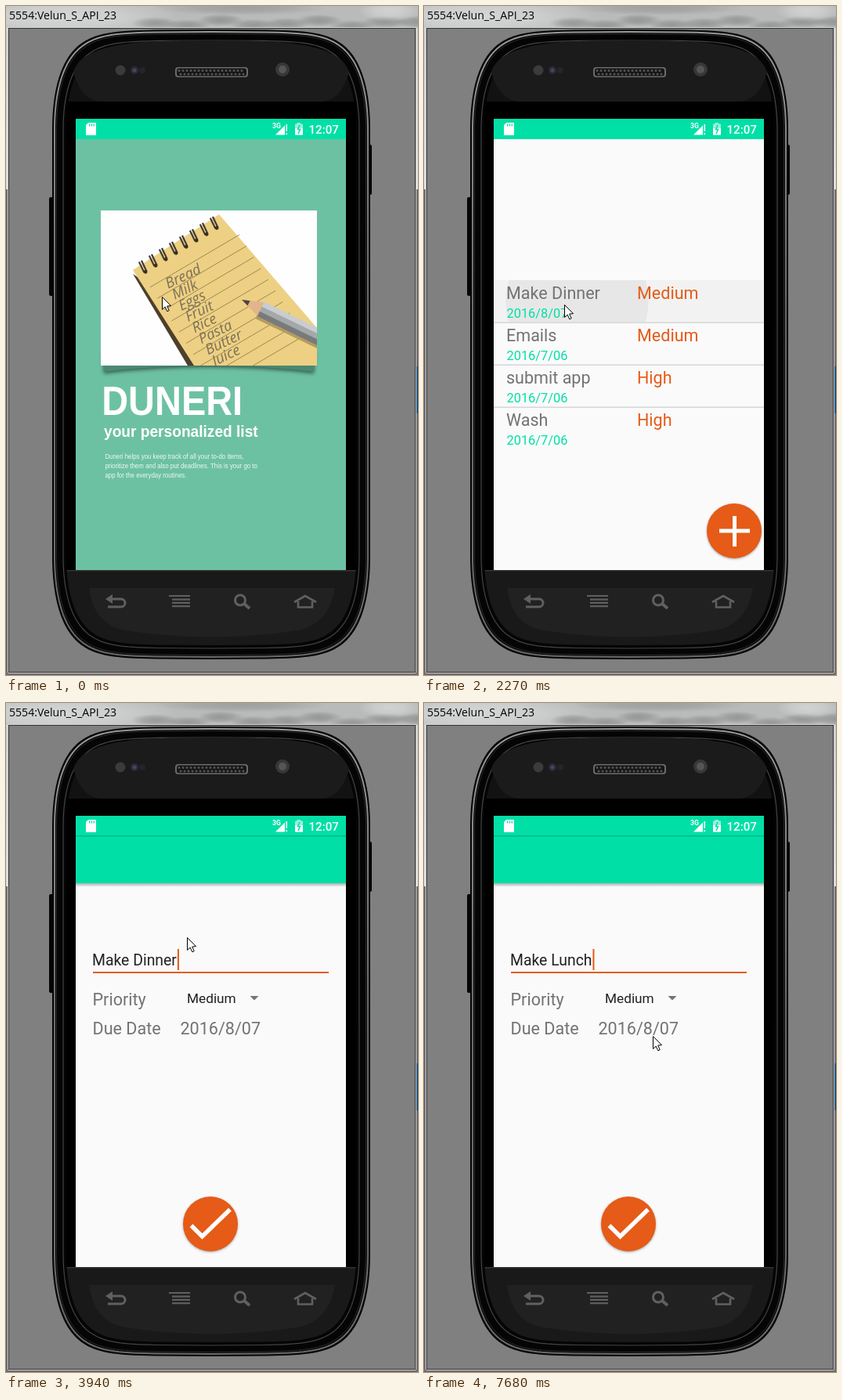
These frames come from a looping animation (526 by 854 pixels, 8 s). An HTML page with a canvas:

```html
<!DOCTYPE html>
<html lang="en">
<head>
<meta charset="utf-8">
<title>To-do app on a phone</title>
<style>
html, body { margin: 0; width: 100%; height: 100%; overflow: hidden; background: #808080; }
canvas { display: block; }
</style>
</head>
<body>
<canvas id="stage" width="526" height="854"></canvas>
<script>
const W = 526, H = 854, LOOP = 8000, TICK = 120;
const GREEN = '#00e0a6', ORANGE = '#e55b17', PAPER = '#fafafa', GREY = '#737373', INK = '#212121';
const SCREEN = { x: 89, y: 144, w: 345, h: 576 };
const SP = 1.078;

const stage = document.getElementById('stage').getContext('2d');
const makeLayer = () => Object.assign(document.createElement('canvas'), { width: W, height: H }).getContext('2d');
const phoneLayer = makeLayer(), windowLayer = makeLayer();
let g = stage;

// ---------- helpers ----------
function rect(x, y, w, h, fill) { g.fillStyle = fill; g.fillRect(x, y, w, h); }

function round(x, y, w, h, r, fill) {
  g.beginPath(); g.roundRect(x, y, w, h, r);
  g.fillStyle = fill; g.fill();
}

function disc(x, y, r, fill) {
  g.beginPath(); g.arc(x, y, r, 0, 7);
  g.fillStyle = fill; g.fill();
}

function trace(points, closed) {
  g.beginPath();
  points.forEach(([x, y]) => g.lineTo(x, y));
  if (closed) g.closePath();
}

function poly(points, fill) { trace(points, true); g.fillStyle = fill; g.fill(); }

function line(points, width, color) {
  trace(points); g.lineWidth = width; g.strokeStyle = color; g.stroke();
}

function at(x, y, angle, draw) {
  g.save(); g.translate(x, y); g.rotate(angle); draw(); g.restore();
}

function text(s, x, y, size, color, font = 'Roboto, sans-serif', style = '') {
  g.font = `${style} ${size}px ${font}`;
  g.fillStyle = color;
  g.fillText(s, x, y);
}

const label = (s, x, y, sp, color) => text(s, x, y, sp * SP, color);

function fade(y0, y1, top, bottom) {
  const f = g.createLinearGradient(0, y0, 0, y1);
  f.addColorStop(0, top); f.addColorStop(1, bottom);
  return f;
}

function glow(x, y, rx, ry, rgb, alpha) {
  g.save();
  g.translate(x, y); g.scale(rx, ry);
  const f = g.createRadialGradient(0, 0, 0, 0, 0, 1);
  f.addColorStop(0, `rgba(${rgb},${alpha})`);
  f.addColorStop(0.5, `rgba(${rgb},${alpha * 0.7})`);
  f.addColorStop(1, `rgba(${rgb},0)`);
  disc(0, 0, 1, f);
  g.restore();
}

function button(x, y, r) {
  g.save();
  g.shadowColor = 'rgba(0,0,0,.35)'; g.shadowBlur = 3; g.shadowOffsetY = 1;
  disc(x, y, r, ORANGE);
  g.restore();
}

// ---------- emulator window and phone ----------
// Straight sides closed by half superellipses at the top and bottom.
function bodyPath(inset) {
  const half = 203 - inset;
  g.beginPath();
  for (let i = 0; i < 240; i++) {
    const a = i / 240 * 2 * Math.PI, c = Math.cos(a), s = Math.sin(a);
    const u = Math.sign(c) * Math.abs(c) ** (2 / 7);
    const v = Math.abs(s) ** (2 / 2.2) * (1 - 0.03 * u * u);
    g.lineTo(262 + half * u, s < 0 ? 160 - (130 - inset) * v : 700 + (134 - inset) * v);
  }
  g.closePath();
}

function rim(inset, width, color) {
  bodyPath(inset); g.strokeStyle = color; g.lineWidth = width; g.stroke();
}

function drawWindowFrame() {
  rect(0, 0, W, H, fade(0, 234, '#c9cbcb', '#e0e0e0'));
  rect(0, 234, W, H, '#706b70');
  rect(522, 460, 4, 60, '#24577d');
  rect(0, 0, W, 28, '#b9bbbb');
  glow(70, 14, 150, 26, '225,227,227', 0.7);
  for (let i = 0; i < 9; i++) glow(190 + i * 42, 22 + 4 * Math.sin(i * 2.3), 30, 8, '120,122,122', 0.55);
  glow(300, 2, 110, 10, '140,142,142', 0.6);
  glow(490, 6, 40, 14, '225,225,225', 0.6);
  round(2, 27, 522, 825, 2, '#d4d4d4');
  rect(3, 28, 520, 823, '#333');
  rect(4, 29, 518, 821, '#808080');
  text('5554:Velun_S_API_23', 4, 17, 14.1, '#000', '"Open Sans", "Noto Sans", sans-serif');
}

function drawPhone() {
  round(55, 244, 8, 126, 2, '#050505');
  round(461, 177, 6, 64, 2, '#050505');
  bodyPath(0); g.fillStyle = '#050505'; g.fill();
  rim(3, 2, fade(30, 400, '#999', '#6a6a6a'));
  rim(5.5, 1, '#2c2c2c');
  rim(14, 1.2, '#444');

  g.save();
  bodyPath(18); g.clip();
  rect(60, 30, 410, 92, '#121212');
  rect(60, 721, 410, 120, '#191919');
  rect(60, 720, 410, 1.5, '#333');
  g.restore();

  g.beginPath();
  g.moveTo(86, 84);
  g.bezierCurveTo(100, 42, 190, 45, 262, 44);
  g.bezierCurveTo(334, 45, 424, 42, 438, 84);
  g.quadraticCurveTo(428, 122, 400, 122);
  g.lineTo(124, 122);
  g.quadraticCurveTo(96, 122, 86, 84);
  g.fillStyle = '#1b1b1b'; g.fill();

  g.beginPath();
  g.moveTo(106, 743);
  g.lineTo(420, 743);
  g.quadraticCurveTo(412, 790, 372, 797);
  g.quadraticCurveTo(262, 814, 152, 797);
  g.quadraticCurveTo(112, 790, 106, 743);
  g.fillStyle = '#212121'; g.fill();

  disc(146, 82, 6.5, '#3b3b3b');
  disc(164, 82, 5, '#2b2b38'); disc(164, 82, 2.5, '#454560');
  disc(174, 82, 4, '#24242c');
  disc(353, 81, 9, '#383838'); disc(353, 81, 5, '#555');

  round(216, 78, 93, 13, 4, '#6b6b6b');
  round(218, 79.5, 89, 10, 3, '#161616');
  for (let x = 221; x < 306; x += 5) {
    disc(x, 82.5, 1.5, '#555'); disc(x + 2, 87, 1.5, '#555');
  }
  drawHardKeys('#606060');
  rect(77, 122, 370, 598, '#000');
}

function drawHardKeys(color) {
  g.strokeStyle = color; g.lineWidth = 3;
  g.beginPath();
  g.moveTo(134, 757); g.lineTo(147, 757);
  g.arc(147, 762, 5, -Math.PI / 2, Math.PI / 2);
  g.lineTo(130, 767); g.stroke();
  poly([[127, 757], [136, 751], [136, 763]], color);

  rect(208, 752, 27, 2, color);
  for (let i = 0; i < 3; i++) rect(212, 756.5 + i * 4.3, 23, 2.2, color);

  g.lineWidth = 3;
  g.beginPath(); g.arc(299, 758.5, 6.5, 0, 7); g.stroke();
  line([[304, 763], [311, 769]], 4, color);

  line([[368, 761], [382, 753], [396, 761]], 2.6, color);
  line([[373, 760], [373, 767.5], [391, 767.5], [391, 760]], 2.6, color);
}

// ---------- app screens ----------
function drawStatusIcons() {
  poly([[105, 149], [115, 149], [115, 165], [102, 165], [102, 152]], '#fff');
  for (let i = 0; i < 3; i++) rect(106 + i * 2.8, 150.5, 1.3, 3, GREEN);
  text('3G', 340, 156, 8.6, '#fff', 'Roboto, sans-serif', 'bold');
  poly([[344, 164.5], [356, 152.5], [356, 164.5]], '#fff');
  rect(356, 149, 4, 16, GREEN);
  rect(357.3, 151, 1.8, 9, '#d9f9ef'); rect(357.3, 162, 1.8, 2.3, '#d9f9ef');
  rect(371.5, 149, 4.5, 3, '#9beeda');
  round(369, 150.5, 10, 14, 1, '#9beeda');
  rect(369, 156, 10, 8.5, '#fff');
  line([[375, 152], [372.5, 157.5], [375.5, 157.5], [373, 163]], 1.6, GREEN);
  text('12:07', 386.5, 163, 14 * SP, '#fff', 'Roboto, sans-serif', '500');
}

function drawBase(background) {
  rect(SCREEN.x, SCREEN.y, SCREEN.w, SCREEN.h, background);
  rect(SCREEN.x, SCREEN.y, SCREEN.w, 26, GREEN);
}

function drawToolbar() {
  rect(89, 170, 345, 60, GREEN);
  rect(89, 169, 345, 1.5, 'rgba(0,60,40,.25)');
  rect(89, 230, 345, 5, fade(230, 235, 'rgba(0,0,0,.3)', 'rgba(0,0,0,0)'));
}

function drawPencil() {
  rect(26, 9, 100, 5, '#b69b5e');
  poly([[0, 0], [28, -10], [28, 10]], '#e2b48c');
  poly([[0, 0], [10, -3.5], [10, 3.5]], '#4b4540');
  ['#c9cdcf', '#a4a8aa', '#777b7e'].forEach((shade, i) => rect(27, -10 + i * 6.7, 100, 7, shade));
}

function drawNotepad() {
  g.save();
  g.beginPath(); g.rect(121, 261, 276, 198); g.clip();
  rect(121, 261, 276, 198, '#fefefe');
  poly([[162, 342], [174, 350], [242, 459], [232, 459]], '#4d402b');
  poly([[162, 337], [272, 266], [397, 411], [397, 459], [240, 459]], '#edd083');

  for (let i = 0; i < 10; i++) {
    const x = 184 + i * 9.2, y = 359 + i * 14.3;
    line([[x, y], [x + 114, y - 67]], 0.9, '#94804f');
  }
  for (let i = 0; i < 8; i++) at(175 + i * 13, 333 - i * 8, -0.45, () => {
    rect(-3, -8, 2.2, 15, '#3f3b35');
    rect(0.5, -8, 2.2, 15, '#3f3b35');
    disc(0, 7, 2.4, '#3a3021');
  });
  ['Bread', 'Milk', 'Eggs', 'Fruit', 'Rice', 'Pasta', 'Butter', 'Juice'].forEach((item, i) =>
    at(207 + i * 8.5, 361 + i * 14.1, -0.45, () =>
      text(item, 0, 0, 18.5, '#7d7057', '"Open Sans", sans-serif', 'italic')));
  at(301, 375, 0.45, drawPencil);
  g.restore();
}

function drawSplash() {
  drawBase('#6dc1a3');
  g.save();
  g.shadowColor = 'rgba(0,0,0,.55)'; g.shadowBlur = 5; g.shadowOffsetY = 2;
  g.beginPath();
  g.moveTo(124, 440); g.lineTo(125, 467);
  g.quadraticCurveTo(259, 451, 393, 467);
  g.lineTo(394, 440);
  g.fillStyle = '#4a8972'; g.fill();
  g.restore();
  drawNotepad();

  // The artwork is shown slightly narrowed to fit the screen.
  const font = '"Liberation Sans", Arial, sans-serif';
  g.save();
  g.translate(125, 0); g.scale(0.92, 1);
  text('DUNERI', -3, 521.5, 51, '#fff', font, 'bold');
  text('your personalized list', 0, 550, 20.8, '#fff', font, 'bold');
  ['Duneri helps you keep track of all your to-do items,',
   'prioritize them and also put deadlines. This is your go to',
   'app for the everyday routines.'].forEach((s, i) => text(s, 1.5, 578 + i * 12.2, 8.55, '#eef8f4', font));
  g.restore();
}

const TASKS = [
  ['Make Dinner', '2016/8/07', 'Medium'],
  ['Emails', '2016/7/06', 'Medium'],
  ['submit app', '2016/7/06', 'High'],
  ['Wash', '2016/7/06', 'High'],
];

function drawList(t) {
  drawBase(PAPER);
  if (t >= 2270) {
    g.save();
    g.beginPath(); g.rect(89, 350, 345, 53.5); g.clip();
    rect(89, 350, 345, 54, '#f2f2f2');
    disc(195.5, 377, 91, '#e7e7e7');
    g.restore();
  }
  TASKS.forEach(([name, date, priority], i) => {
    const y = 350 + i * 54;
    if (i) rect(89, y - 0.5, 345, 1.5, '#d6d6d6');
    label(name, 105, y + 24, 20, GREY);
    label(date, 105.5, y + 48, 15.2, GREEN);
    label(priority, 272, y + 24, 20, ORANGE);
  });
  button(396, 670, 35);
  rect(377, 667.5, 39, 5, '#fff');
  rect(394, 651, 5, 39, '#fff');
}

function drawDetail() {
  drawBase(PAPER);
  drawToolbar();
  button(132, 200, 24);
  for (const turn of [1, -1]) at(132, 200, turn * Math.PI / 4, () => rect(-18.5, -2, 37, 4, '#fff'));
  button(392, 200, 24);
  rect(376.5, 210, 30, 5, '#f2a681');
  at(392, 197, -Math.PI / 4, () => {
    poly([[-14, 0], [-10, -3.2], [7, -3.2], [7, 3.2], [-10, 3.2]], '#fff');
    rect(9, -3.2, 4, 6.4, '#fff');
  });

  [['TO-DO', 'Make Dinner', 20], ['Priority', 'Medium', 20], ['Due By', '2016/8/07', 18]].forEach(([name, value, sp], i) => {
    const y = 406 + i * 73;
    label(name, 105.5, y, 20, GREEN);
    label(value, 200.5, y - (20 - sp), sp, ORANGE);
  });
}

// Backspacing slows towards the end of the word; typing is steady after the first letter.
const eraseAt = k => 5050 + 120 * k + 0.85 * k ** 4;
const typeAt = k => k ? 7120 + 140 * k : 6890;

function typing(t) {
  const past = (word, when) => [...word].map((_, k) => when(k)).filter(time => time <= t);
  const erased = past('Dinner', eraseAt), typed = past('Lunch', typeAt);
  return {
    value: 'Make ' + (typed.length ? 'Lunch'.slice(0, typed.length) : 'Dinner'.slice(0, 6 - erased.length)),
    lastKey: Math.max(3520, ...erased, ...typed),
  };
}

function drawEdit(t) {
  drawBase(PAPER);
  drawToolbar();
  const { value, lastKey } = typing(t);
  label(value, 110, 335, 18, INK);
  const caretOn = Math.floor((t - lastKey) / 515) % 2 === 0;
  if (caretOn) rect(111 + g.measureText(value).width, 314, 2, 27, ORANGE);
  rect(111, 343, 301, 2, ORANGE);
  label('Priority', 110.5, 386, 20, GREY);
  label('Medium', 231, 382.5, 16, INK);
  poly([[311.5, 374], [322.5, 374], [317, 379.5]], '#757575');
  label('Due Date', 110.5, 423, 20, GREY);
  label('2016/8/07', 222.5, 423, 20, GREY);
  button(261, 665, 35);
  line([[236.5, 667], [250.5, 681], [286, 646.5]], 5.5, '#fff');
}

// ---------- timeline ----------
// Each screen: when it first shows, and how far its entrance has run by then.
const SCREENS = [
  { start: 0, lead: 400, draw: drawSplash },
  { start: 670, lead: 67, draw: drawList },
  { start: 2420, lead: 27, draw: drawDetail },
  { start: 3520, lead: 50, draw: drawEdit },
];

function drawApp(t) {
  const index = SCREENS.findLastIndex(s => s.start <= t);
  const { start, lead, draw } = SCREENS[index];
  const age = lead + Math.floor((t - start) / TICK) * TICK;
  const left = span => 1 - Math.min(age / span, 1);
  const slide = Math.round(SCREEN.h * 0.08 * left(350) ** 5);

  if (age < 350) {
    SCREENS[index - 1].draw(t);
    rect(SCREEN.x, SCREEN.y, SCREEN.w, SCREEN.h, `rgba(0,0,0,${age / 1000})`);
  }
  g = windowLayer;
  g.clearRect(0, 0, W, H);
  draw(t);
  g = stage;
  g.globalAlpha = 1 - left(200) ** 4;
  g.drawImage(windowLayer.canvas, 0, slide);
  g.globalAlpha = 1;
  drawStatusIcons();
}

// Pointer glides: arrival time, number of steps, resting place.
const GLIDES = [
  [0, 1, 199, 371], [240, 2, 238, 469], [1660, 1, 184, 402], [1810, 1, 179, 381],
  [2930, 2, 386, 181], [3790, 2, 212, 283], [4060, 2, 249, 315], [4340, 2, 292, 425],
];

function drawPointer(t) {
  let x = 0, y = 0;
  for (const [arrival, steps, toX, toY] of GLIDES) {
    const done = steps + Math.floor((t - arrival) / TICK);
    const p = Math.max(0, Math.min(1, done / steps));
    x += (toX - x) * p;
    y += (toY - y) * p;
  }
  at(Math.round(x) + 0.5, Math.round(y) + 0.5, 0, () => {
    trace([[0, 0], [0, 16], [3.7, 12.6], [6.3, 18.3], [8.7, 17.2], [6.2, 11.6], [11, 11.2]], true);
    g.fillStyle = '#fff'; g.fill();
    g.lineWidth = 1; g.strokeStyle = '#000'; g.stroke();
  });
}

function frame() {
  const t = performance.now() % LOOP;
  g = stage;
  g.drawImage(phoneLayer.canvas, 0, 0);
  g.save();
  g.beginPath(); g.rect(SCREEN.x, SCREEN.y, SCREEN.w, SCREEN.h); g.clip();
  drawApp(t);
  g.restore();
  drawPointer(t);
  requestAnimationFrame(frame);
}

g = phoneLayer;
drawWindowFrame();
drawPhone();
frame();
</script>
</body>
</html>
```
